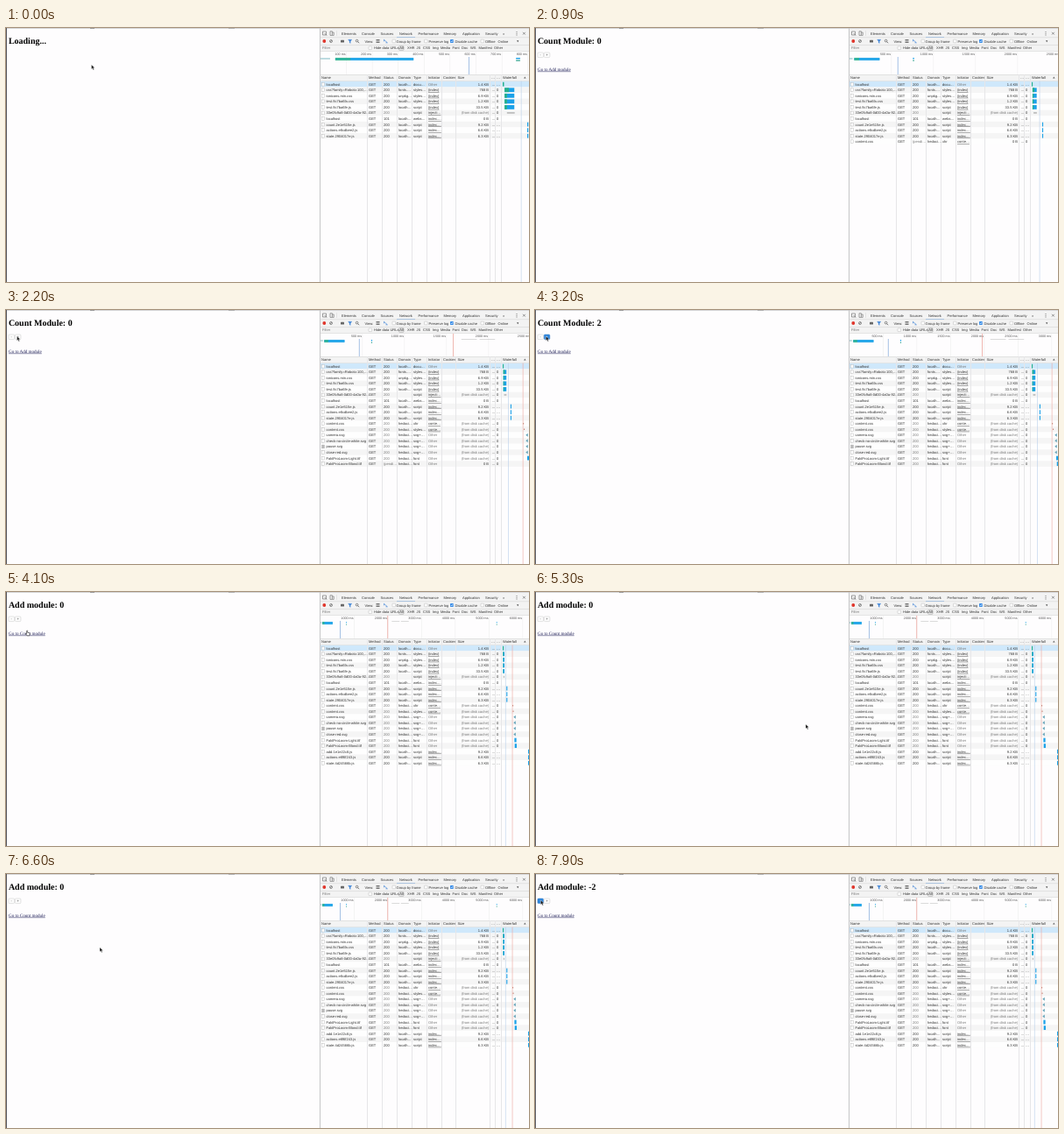
An HTML page for the animation above (8 s loop, 597 by 290 pixels).

```html
<!DOCTYPE html>
<html lang="en">
<head>
<meta charset="utf-8">
<title>Lazy modules</title>
<style>
  html, body { margin: 0; width: 597px; height: 290px; overflow: hidden; background: #fefdfe; }
  svg { display: block; text-rendering: geometricPrecision; }
  text { font: 4.06px "Liberation Sans", Arial, sans-serif; fill: #333; white-space: pre; }
  .h1 { font: bold 10px "Liberation Serif", Times, serif; fill: #000; }
  .link { font: 5.1px "Liberation Serif", Times, serif; fill: #22225a; text-decoration: underline #8a8aa8; }
  .dim { fill: #777; }
  .tick { font-size: 3.7px; fill: #555; }
  .under { text-decoration: underline; }
</style>
</head>
<body>
<svg id="stage" width="597" height="290" viewBox="0 0 597 290">
  <g id="panel"></g>
  <g id="net"></g>
  <g id="page"></g>
  <g id="tip"></g>
  <g id="cursor"></g>
</svg>
<script>
const LOOP = 8000, LEFT = 359, FALL = 567, ROW_Y = 60.9, ROW_H = 6.555;
const BLUE = '#1ba1e8', GREEN = '#27b08b', RED = '#eda79f';
const $ = id => document.getElementById(id);

const rect = (x, y, w, h, fill, more = '') =>
  `<rect x="${x}" y="${y}" width="${w}" height="${h}" fill="${fill}" ${more}/>`;
const text = (x, y, s, cls = '', more = '') =>
  `<text x="${x}" y="${y}" class="${cls}" ${more}>${s}</text>`;
const path = (d, stroke, w = .6, fill = 'none') =>
  `<path d="${d}" stroke="${stroke}" stroke-width="${w}" fill="${fill}"/>`;
const box = (x, y, on) => on
  ? rect(x, y, 3.8, 3.8, '#3b8ee8', 'rx=".7"') + path(`M${x + .9} ${y + 2}l.8 .9l1.5 -2`, '#fff', .6)
  : rect(x, y, 3.6, 3.6, '#fff', 'rx=".6" stroke="#aaa" stroke-width=".4"');
const labels = (y, list) => list.map(([x, s]) => text(x, y, s)).join('');

// name | status | domain | type | initiator | size | start ms | end ms
const ROWS = `localhost|200|localh…|docu…|Other|1.4 KB|0|40
css?family=Roboto:100,…|200|fonts.…|styles…|(index)|768 B|57|358
ionicons.min.css|200|unpkg…|styles…|(index)|6.9 KB|57|358
test.9c7ba6fa.css|200|localh…|styles…|(index)|1.2 KB|57|358
test.9c7ba6fe.js|200|localh…|script|(index)|33.5 KB|57|358
33e0fc9a8-0d00-4a0a-92…|200| |script|injecti…|*|130|370
localhost|101|localh…|webs…|index.…|0 B|0|0
count.2e1e515e.js|200|localh…|script|index.…|9.2 KB|755|790
actions.e8cdbee2.js|200|localh…|script|index.…|6.6 KB|755|790
state.2904017e.js|200|localh…|script|index.…|6.3 KB|755|790
content.css|200|hedoci…|xhr|conte…|*|1960|1990
content.css|200|hedoci…|styles…|conte…|*|2040|2080
camera.svg|200|hedoci…|svg+…|Other|*|2270|2440
check-no-circle-white.svg|200|hedoci…|svg+…|Other|*|2270|2440
pause.svg|200|hedoci…|svg+…|Other|*|2270|2440
close-red.svg|200|hedoci…|svg+…|Other|*|2270|2440
FaktProLoom-Light.ttf|200|hedoci…|font|Other|*|2380|2780
FaktProLoom-Blond.ttf|200|hedoci…|font|Other|*|2440|2840
add.1e1e22c8.js|200|localh…|script|index.…|9.2 KB|5160|5300
actions.e8f6f243.js|200|localh…|script|index.…|6.6 KB|5160|5300
state.4d24566b.js|200|localh…|script|index.…|6.3 KB|5160|5300`.split('\n').map(r => r.split('|'));

// from: start time, k: ms per overview pixel, w: ms per waterfall pixel, gap: pixels between ruler ticks
const SCENES = [
  { from: 0, k: 3.37, w: 27, rows: 10, step: 100, gap: 29.6 },
  { from: 500, k: 10.4, w: 63, rows: 10, step: 500, gap: 48 },
  { from: 700, k: 10.4, w: 63, rows: 11, step: 500, gap: 48, pending: 10 },
  { from: 1200, k: 13, w: 85, rows: 18, step: 500, gap: 48, pending: 17, load: true },
  { from: 2300, k: 13, w: 85, rows: 18, step: 500, gap: 38.5, load: true },
  { from: 4100, k: 25.7, w: 178, rows: 21, step: 1000, gap: 38.5, load: true }
];

const TITLES = [
  [0, 'Loading...'], [500, 'Count Module: 0'], [2500, 'Count Module: 1'], [2900, 'Count Module: 2'],
  [3300, 'Count Module: 3'], [3900, 'Loading...'], [4100, 'Add module: 0'],
  [7400, 'Add module: -1'], [7600, 'Add module: -2']
];
// start, end, button
const PRESSES = [[2400, 2500, 1], [2800, 2900, 1], [3200, 3300, 1], [7300, 7400, 0], [7500, 7600, 0], [7900, 8000, 0]];
// time, x, y
const TRAIL = [
  [0, 97.5, 42], [300, 44, 22], [500, 44, 22], [900, 28.5, 16], [1050, 29, 20], [1400, 39.5, 35.5],
  [1800, 24, 33], [2200, 12.5, 30], [3300, 12.5, 30], [3700, 24, 44.3], [4600, 24, 44.3],
  [5000, 170, 96], [5500, 383.5, 180.5], [6050, 383.5, 180.5], [6400, 116, 88],
  [6500, 113, 87], [7200, 6.5, 30], [8000, 6.5, 30]
];

const last = (list, t) => list.filter(e => (e.from ?? e[0]) <= t).pop();

function drawPanel() {
  const tabs = [[383, 'Elements'], [406, 'Console'], [427.5, 'Sources'], [449, 'Network'], [470.5, 'Performance'],
    [499.5, 'Memory'], [521, 'Application'], [547, 'Security'], [567, '»']];
  const tools = [[409.5, 'View:'], [445.5, 'Group by frame'], [482.5, 'Preserve log'], [512.5, 'Disable cache'],
    [547, 'Offline'], [561.5, 'Online']];
  const filters = [[420, 'Hide data URLs'], [449.2, 'All'], [458, 'XHR'], [468.5, 'JS'], [476, 'CSS'], [487, 'Img'],
    [496, 'Media'], [509.5, 'Font'], [520, 'Doc'], [530, 'WS'], [539.5, 'Manifest'], [557, 'Other']];
  const heads = [[360, 'Name'], [414, 'Method'], [431, 'Status'], [448, 'Domain'], [465, 'Type'], [482, 'Initiator'],
    [499, 'Cookies'], [515.5, 'Size'], [554, '…'], [560, '…'], [567, 'Waterfall']];
  let s = rect(0, 0, 597, 1, '#d6d6d8') + rect(96, 0, 5, .6, '#777') + rect(254, 0, 7, .6, '#999')
    + rect(0, 0, 1, 290, '#55555d')
    + rect(358, 1, 239, 25.5, '#f3f3f3') + rect(358, 53, 239, 7.5, '#f3f3f3')
    + rect(446, 10, 21, .7, '#6ba3e4');
  for (const y of [10.6, 19.2, 26.4, 53, 60.3]) s += rect(358, y, 239, .5, '#cfcfcf');
  s += path('M361.5 4h4v4h-4zM363.6 6l2.6 2.6', '#666')
    + path('M370 3.8h2.4v4.6h-2.4zM372.6 5h1.6v3.4h-1.6', '#666')
    + rect(377.5, 3, .4, 6, '#ccc')
    + '<circle cx="363.3" cy="15" r="1.9" fill="#e0352b"/>'
    + '<circle cx="371" cy="15" r="1.5" fill="none" stroke="#666" stroke-width=".7"/>' + path('M370 16l2 -2', '#666')
    + rect(382, 13.8, 4, 2.8, '#666', 'rx=".5"')
    + path('M390.6 13.2h4.2l-1.6 2v2.2l-1 -.7v-1.5z', '#3b82d6', .3, '#3b82d6')
    + '<circle cx="400.6" cy="14.6" r="1.3" fill="none" stroke="#555" stroke-width=".7"/>' + path('M401.5 15.6l1.6 1.6', '#555', .8)
    + path('M422.5 13.5h4M422.5 15h4M422.5 16.5h4', '#555', .8)
    + path('M431.5 13.3l3.7 3.4M431.5 13.3v2M435.5 16.8h-2', '#3b82d6', .7)
    + path('M583 14.2l2.4 0l-1.2 2z', 'none', 0, '#555')
    + labels(7.6, tabs) + labels(16.5, tools) + text(361, 24.2, 'Filter', 'dim')
    + box(414, 21, false) + rect(448.4, 20.5, 5.8, 5, '#e4e4e4', 'rx="1.2" stroke="#999" stroke-width=".4"')
    + labels(24.2, filters)
    + [441, 477.5, 542].map(x => box(x, 13.2, false)).join('') + box(507, 13.1, true)
    + '<g fill="#555"><circle cx="583" cy="4.4" r=".5"/><circle cx="583" cy="6.2" r=".5"/><circle cx="583" cy="8" r=".5"/></g>'
    + path('M590 4.8l2.8 2.8M592.8 4.8l-2.8 2.8', '#555')
    + labels(58.1, heads) + path('M591 57.6l1.3 -2l1.3 2z', 'none', 0, '#666');
  $('panel').innerHTML = s;
}

function overview(sc) {
  const at = ms => LEFT + ms / sc.k;
  const span = (a, b, y, h, fill) => at(a) > 597 ? '' : rect(at(a), y, Math.max(.8, (b - a) / sc.k), h, fill);
  const chunk = ms => span(ms, ms + 16, 34, 1.4, BLUE) + span(ms, ms + 16, 36.5, 1.4, '#4aae9d');
  let s = '';
  for (let n = 1; n * sc.gap < 242; n++) {
    const x = LEFT + n * sc.gap;
    s += rect(x - .3, 27, .4, 26, '#e6e6e6') + text(x - 1, 31.2, n * sc.step + ' ms', 'tick', 'text-anchor="end"');
  }
  s += span(0, 37, 34.5, 1, '#7fb9c4') + span(57, 358, 34, 3, BLUE) + span(57, 115, 34, 3, GREEN)
    + span(57, 358, 35.4, .4, '#62c5ee')
    + span(570, 570, 33, 20, '#8fb2de') + chunk(752);
  if (sc.load) s += span(1963, 1963, 27, 26, RED) + span(2090, 2320, 33.4, .6, '#c4c4c4') + span(2360, 2590, 33.4, .6, '#c4c4c4');
  return sc.rows > 18 ? s + chunk(5160) : s;
}

function waterfall(i, a, b, sc, y) {
  const x = FALL + a / sc.w, w = Math.max(1.1, (b - a) / sc.w);
  if (x > 597 || b == 0) return '';
  if (i == 5) return rect(x, y + 2.6, w, 1.3, '#aaa');
  if (i == 10 || i == 11) return rect(x, y + 2.5, w, 1.5, '#c98a7c');
  if (i > 11 && i < 16) return path(`M${x + 2} ${y + 1.2}v4l-2.4 -2z`, 'none', 0, '#5f9fb5');
  const bar = rect(x, y + .9, w, 4.8, i == 0 ? GREEN : BLUE);
  return i > 0 && i < 5 ? bar + rect(x, y + .9, w * (i == 1 ? .45 : .25), 4.8, GREEN) : bar;
}

function network(sc, hover) {
  let grid = '', cells = '';
  for (let i = 0; i < sc.rows; i++) {
    const [name, status, domain, type, init, size, a, b] = ROWS[i];
    const y = ROW_Y + i * ROW_H, base = y + 4.75;
    const waiting = sc.pending == i;
    const cached = size == '*' && !waiting;
    const dim = cached || waiting ? 'dim' : '';
    grid += rect(359, y, 238, ROW_H, i == 0 ? '#cfe8fb' : hover && i == 18 ? '#e9f2fb' : i % 2 ? '#f5f5f5' : '#fefefe');
    cells += rect(360.5, y + 1.4, 3, 3.8, i == 14 ? '#bbb' : '#fff', 'stroke="#aaa" stroke-width=".4"')
      + text(365.5, base, name) + text(414, base, 'GET')
      + text(431, base, waiting ? '(pendi…' : status, dim) + text(448, base, domain) + text(465, base, type)
      + text(482, base, init, init == 'Other' ? 'dim' : 'under')
      + text(551, base, cached ? '(from disk cache)' : waiting ? '0 B' : size, cached ? 'dim' : '', 'text-anchor="end"')
      + text(554.5, base, '…') + text(560, base, i == 0 || i > 6 && i < 10 || i > 17 ? '…' : '0')
      + (waiting ? '' : waterfall(i, +a, +b, sc, y));
  }
  const cols = [412, 429, 446, 463, 480, 497, 513, 552, 558, 565]
    .map(x => rect(x, 53, 1, 237, '#e6e6e8')).join('');
  const mark = (ms, c) => FALL + ms / sc.w < 597 ? rect(FALL + ms / sc.w - .3, 60.5, .6, 230, c) : '';
  return overview(sc) + grid + cols + mark(570, '#b9cfea') + (sc.load ? mark(1963, RED) : '') + cells
    + rect(358, 0, 1, 290, '#c6c6c8');
}

function button(x, sign, down) {
  return rect(x, 28, 6.5, 5.6, down ? '#2f86dc' : '#fcfcfc', `rx="1" stroke="${down ? '#2f78c4' : '#c9c9c9'}" stroke-width=".5"`)
    + text(x + 3.2, 32.1, sign, '', `text-anchor="middle" ${down ? 'style="fill:#fff"' : ''}`);
}

function page(title, pressed) {
  const s = text(2.9, 17.8, title, 'h1');
  if (title.startsWith('Loading')) return s;
  const other = title.startsWith('Count') ? 'Add' : 'Count';
  return s + button(3, '-', pressed === 0) + button(10.4, '+', pressed === 1)
    + text(3, 48.6, `Go to ${other} module`, 'link');
}

const ARROW = path('M0 0v5l1.2 -1.1l.9 2l.9 -.4l-.9 -1.9h1.7z', '#fff', .35, '#111');
const HAND = path('M-.4 0q.6 -.7 1.1 0v2l2 .5q.7 .3 .5 1.1l-.5 1.9h-2.6l-1.7 -2.2q.2 -.8 1.2 0z', '#111', .55, '#fff');
const BEAM = path('M-1.2 -2.8q1.2 0 1.2 .8v4q0 .8 -1.2 .8M1.2 -2.8q-1.2 0 -1.2 .8M0 2q0 .8 1.2 .8', '#222', .55);

function pointerAt(t) {
  const i = TRAIL.findIndex(p => p[0] > t);
  const [t0, x0, y0] = TRAIL[i - 1], [t1, x1, y1] = TRAIL[i];
  const u = (t - t0) / (t1 - t0), e = u * u * (3 - 2 * u);
  return [x0 + (x1 - x0) * e, y0 + (y1 - y0) * e];
}

const shown = {};
function put(id, key, make) {
  if (shown[id] === key) return;
  shown[id] = key;
  $(id).innerHTML = make();
}

function render(t) {
  const sc = last(SCENES, t), title = last(TITLES, t)[1];
  const press = PRESSES.find(([a, b]) => t >= a && t < b);
  const pressed = press ? press[2] : -1;
  const [x, y] = pointerAt(t);
  const hover = x > 359 && y > 178;
  const tip = t >= 5700 && t < 6150;
  const shape = t > 800 && t < 1050 ? BEAM : t > 3600 && t < 4650 || hover ? HAND : ARROW;

  put('net', sc.from + '/' + hover, () => network(sc, hover));
  put('page', title + pressed, () => page(title, pressed));
  put('tip', tip, () => tip ? rect(387.5, 187.3, 68.5, 7, '#ececec', 'stroke="#c4c4c4" stroke-width=".5"')
    + text(390.3, 192.2, 'http://localhost:1234/add.1e1e22c8.js', '', 'style="font-size:3.95px"') : '');
  put('cursor', shape, () => shape);
  $('cursor').setAttribute('transform', `translate(${x.toFixed(2)} ${y.toFixed(2)})`);
}

drawPanel();
render(0);
const start = performance.now();
(function tick() {
  render((performance.now() - start) % LOOP);
  requestAnimationFrame(tick);
})();
</script>
</body>
</html>
```
